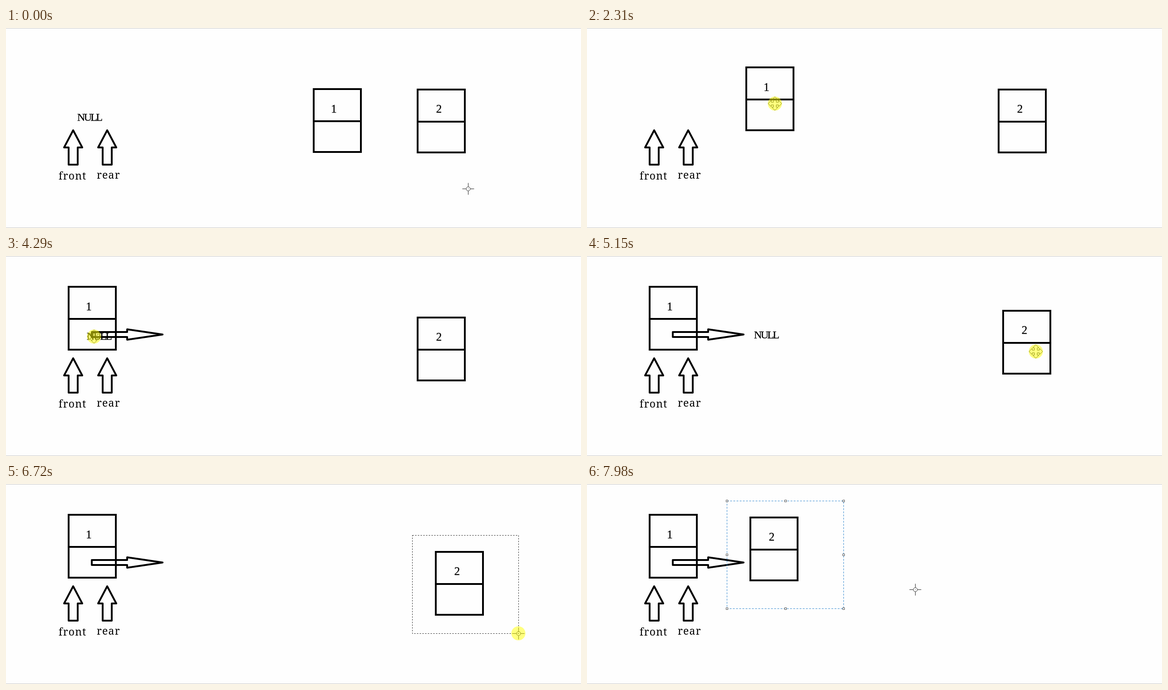
Animation, 1267 px wide and 442 px high, one loop 8000 ms. Source, as an HTML page:

```html
<!DOCTYPE html>
<html lang="en">
<head>
<meta charset="utf-8">
<title>Linked queue</title>
<style>
  html, body { margin: 0; width: 100%; height: 100%; overflow: hidden; background: #fefefe; }
  svg { display: block; width: 1267px; height: 442px; }
  .ink { fill: none; stroke: #000; stroke-width: 4; stroke-linejoin: round; }
  .box { stroke-linejoin: miter; }
  text { font: 25px "Liberation Serif", serif; stroke: #000; stroke-width: .3; }
  .label { font: 23px "Noto Serif", serif; letter-spacing: 1.2px; stroke: none; }
  .null { font-size: 24px; letter-spacing: -2.7px; }
  .edge { stroke: #c8c8c8; }
  .marquee { fill: none; stroke: #222; stroke-dasharray: 3 3; }
  .picked { stroke: #2f86cf; stroke-dasharray: 4 3; }
  .grips rect { fill: #fff; stroke: #555; }
  .pointer { fill: none; stroke: #222; }
  .glow { fill: #ff0; fill-opacity: .5; }
</style>
</head>
<body>
<svg viewBox="0 0 1267 442">
  <defs>
    <path id="up" class="ink" d="M148 226L168 264H158V302H138V264H128Z"/>
    <path id="box" class="ink box" d="M0 0H104V139H0ZM0 71H104"/>
  </defs>
  <path class="edge" d="M0 .5H1267M0 441.5H1267"/>
  <use href="#up"/>
  <use href="#up" x="75"/>
  <text class="label" x="116" y="335">front</text>
  <text class="label" x="200" y="333">rear</text>
  <text class="null" id="oldNull" x="157" y="205">NULL</text>
  <text class="null" id="newNull" x="22" y="187">NULL</text>
  <g id="one"><use href="#box" x="678" y="135"/><text x="722.5" y="187" text-anchor="middle">1</text></g>
  <g id="two"><use href="#box" x="907" y="136"/><text x="954" y="187" text-anchor="middle">2</text></g>
  <path id="link" class="ink"/>
  <path id="frame" class="marquee"/>
  <g id="grips" class="grips"></g>
  <g id="hand">
    <g id="cross" class="pointer" transform="translate(.5 .5)">
      <circle r="4.5"/>
      <path d="M-13 0H-5M5 0H13M0-13V-5M0 5V13M-.5 0H.5"/>
    </g>
    <path id="mover" class="pointer"
      d="M0-15L7-8H3V-3H8V-7L15 0L8 7V3H3V8H7L0 15L-7 8H-3V3H-8V7L-15 0L-8-7V-3H-3V-8H-7Z"/>
    <circle id="glow" class="glow" r="15.5"/>
  </g>
</svg>
<script>
const LOOP = 8000, SELECT = 200;
const $ = id => document.getElementById(id);

// A gesture pulls a marquee over an item, then drags it along a slightly bent line
const gestures = [
  { item: 'one', press: 300, from: [612, 92], size: [226, 246],
    grab: 580, drop: 700, at: [730, 210], move: [19, -11] },
  { item: 'oldNull', press: 1000, from: [152, 162], size: [90, 50],
    grab: 1446, drop: 1510, at: [198, 187], move: [-260, -7] },
  { item: 'one', press: 1760, from: [631, 95], size: [212, 196],
    grab: 2050, drop: 2500, at: [760, 204], move: [-559, -56], bend: -3 },
  { item: 'link', press: 2720, from: [352, 35], size: [158, 24],
    grab: 3300, drop: 3387, at: [445, 45], move: [-164, 127] },
  { item: 'newNull', grab: 4160, drop: 4440, at: [38, 180], move: [346, -5] },
  { item: 'two', press: 4771, from: [840, 85], size: [254, 246],
    grab: 5080, drop: 5295, at: [979, 226], move: [40, 14], bend: -26 },
  { item: 'newNull', press: 5860, from: [346, 146], size: [114, 76],
    grab: 6110, drop: 6380, at: [398, 176], move: [42, -240] },
  { item: 'two', press: 6558, from: [895, 113], size: [257, 238],
    grab: 6860, drop: 7400, at: [1010, 235], move: [-587, -76] }
];

// Places where the hand waits between gestures
const rests = [
  { t: 0, until: 50, at: [1018, 355] },
  { t: 1510, until: 1640, at: [-62, 180] },
  { t: 1650, until: 1660, at: [176, 130] },
  { t: 3010, until: 3280, at: [450, 50] },
  { t: 3770, until: 4090, at: [166, 238] },
  { t: 5700, until: 5720, at: [598, 215] },
  { t: 7980, until: LOOP, at: [723, 233] }
];

const add = (a, b, k = 1) => [a[0] + b[0] * k, a[1] + b[1] * k];
const within = (t, a, b) => t >= a && t < b;

function ease(t, a, b) {
  const u = Math.min(1, Math.max(0, (t - a) / (b - a)));
  return u * u * (3 - 2 * u);
}

const pulled = (g, t) => ease(t, g.press, g.press + SELECT);

function dragged(g, t) {
  const e = ease(t, g.grab, g.drop);
  return [g.move[0] * e, g.move[1] * e + (g.bend || 0) * Math.sin(Math.PI * e)].map(Math.round);
}

const offset = (item, t) =>
  gestures.filter(g => g.item === item).reduce((sum, g) => add(sum, dragged(g, t)), [0, 0]);

const keys = rests.flatMap(r => [{ t: r.t, at: r.at }, { t: r.until, at: r.at }]);
for (const g of gestures) {
  if (g.press) keys.push({ t: g.press, at: g.from }, { t: g.press + SELECT, at: add(g.from, g.size) });
  keys.push({ t: g.grab, at: g.at }, { t: g.drop, at: add(g.at, g.move) });
}
keys.sort((a, b) => a.t - b.t);

function pointer(t) {
  const drag = gestures.find(g => within(t, g.grab, g.drop));
  if (drag) return add(drag.at, dragged(drag, t));
  const next = keys.findIndex(k => k.t > t);
  const a = keys[next - 1], b = keys[next];
  return add(a.at, add(b.at, a.at, -1), ease(t, a.t, b.t)).map(Math.round);
}

const place = (id, [x, y]) => $(id).setAttribute('transform', `translate(${x} ${y})`);
const show = (id, on) => { $(id).style.display = on ? '' : 'none'; };

function drawLink(t) {
  const g = gestures.find(g => g.item === 'link');
  const [x, y] = add(add(g.from, [1, 0]), dragged(g, t));
  const w = (g.size[0] - 2) * pulled(g, t), h = (g.size[1] - 1) * pulled(g, t);
  const neck = x + w / 2;
  $('link').setAttribute('d', `M${x} ${y + h * .26}H${neck}V${y}L${x + w} ${y + h / 2}` +
    `L${neck} ${y + h}V${y + h * .74}H${x}Z`);
  show('link', t > g.press);
}

const grips = [];
for (const u of [0, .5, 1]) for (const v of [0, .5, 1]) {
  if (u === .5 && v === .5) continue;
  const el = document.createElementNS('http://www.w3.org/2000/svg', 'rect');
  el.setAttribute('width', 4);
  el.setAttribute('height', 4);
  $('grips').append(el);
  grips.push({ el, u, v });
}

function drawSelection(t) {
  const g = gestures.filter(g => (g.press || g.grab) <= t).pop();
  const pulling = g && t < g.press + SELECT;
  const held = g && g.press && !pulling && !within(t, g.grab, g.drop);
  show('frame', held || pulling && g.item !== 'link');
  show('grips', held);
  if (!held && !pulling) return;
  const [x, y] = add(add(g.from, dragged(g, t)), [.5, .5]);
  const [w, h] = g.size.map(s => Math.round(s * pulled(g, t)));
  $('frame').setAttribute('d', `M${x} ${y}h${w}v${h}h${-w}Z`);
  $('frame').setAttribute('class', held ? 'marquee picked' : 'marquee');
  for (const { el, u, v } of grips) {
    el.setAttribute('x', Math.floor(x + w * u) - 1.5);
    el.setAttribute('y', Math.floor(y + h * v) - 1.5);
  }
}

function draw(t) {
  for (const id of ['one', 'two', 'oldNull', 'newNull']) place(id, offset(id, t));
  show('newNull', t >= gestures.find(g => g.item === 'newNull').grab);
  drawLink(t);
  drawSelection(t);
  const moving = gestures.some(g => within(t, g.grab, g.drop));
  const pressing = gestures.some(g => within(t, g.press, g.press + SELECT));
  place('hand', pointer(t));
  show('cross', !moving);
  show('mover', moving);
  show('glow', moving || pressing);
}

const start = performance.now();
function tick() {
  draw((performance.now() - start) % LOOP);
  requestAnimationFrame(tick);
}
tick();
</script>
</body>
</html>
```
